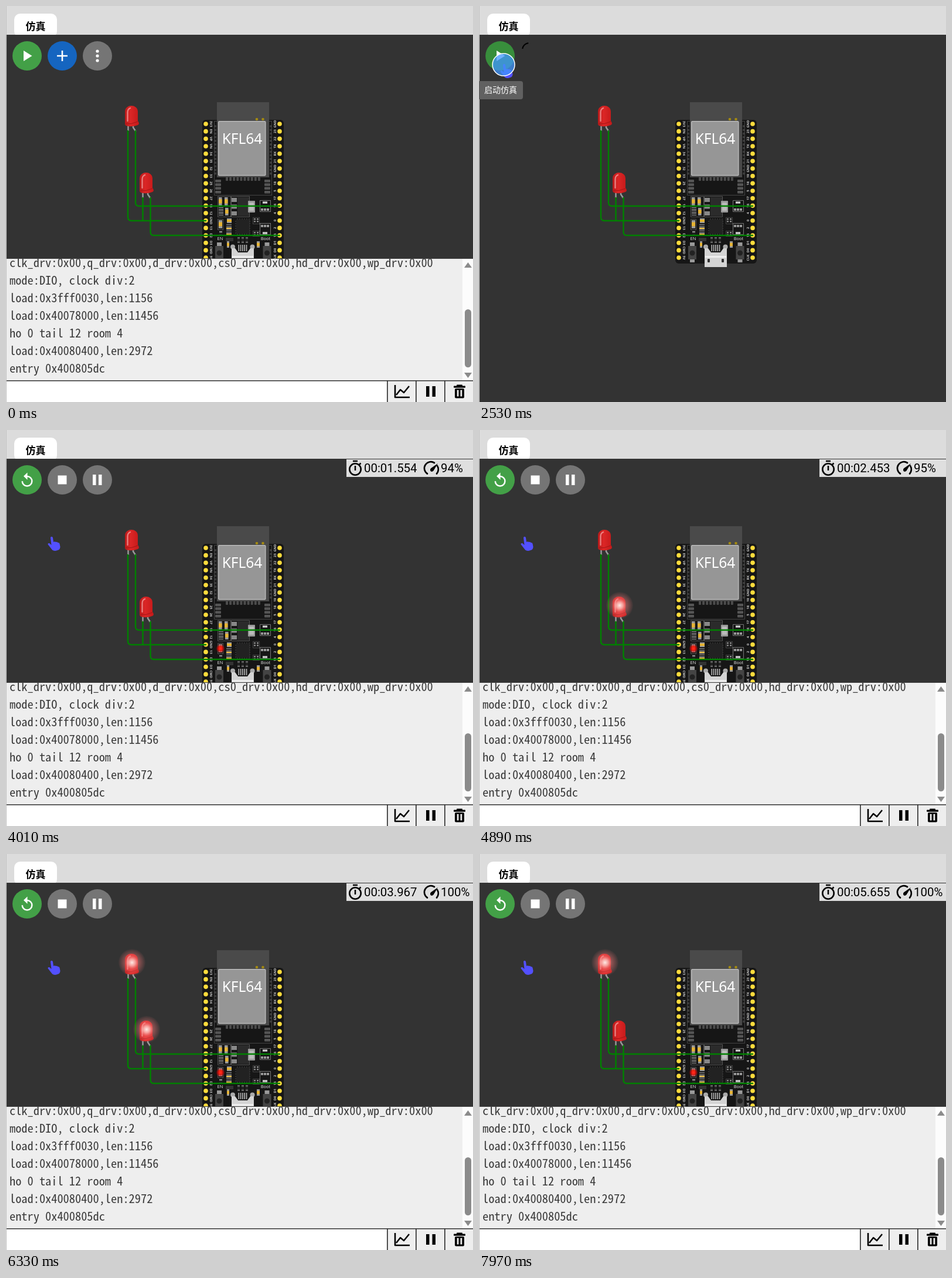
Recreate the animation shown at these times as an HTML page with a canvas. Size 797x675 px, loop 8 s.

```html
<!DOCTYPE html>
<html lang="zh">
<head>
<meta charset="utf-8">
<style>
html, body { margin: 0; width: 100%; height: 100%; overflow: hidden; background: #dcdcdc; }
canvas { display: block; }
</style>
</head>
<body>
<canvas id="stage" width="797" height="675"></canvas>
<script>
const g = document.getElementById('stage').getContext('2d');
const LOOP = 8000, RUN = 2570, CLICK = 2370, TAU = Math.PI * 2;
const SANS = '"Noto Sans", "Open Sans", sans-serif';
const CJK = '"Noto Sans CJK SC", "Noto Sans CJK", sans-serif';
const MONO = '"Noto Sans Mono CJK SC", "Liberation Mono", monospace';

// Choose the console size from the advance of one character.
g.font = '100px ' + MONO;
const monoSize = 1018 / g.measureText('0').width;

const LOG = [
  'clk_drv:0x00,q_drv:0x00,d_drv:0x00,cs0_drv:0x00,hd_drv:0x00,wp_drv:0x00',
  'mode:DIO, clock div:2',
  'load:0x3fff0030,len:1156',
  'load:0x40078000,len:11456',
  'ho 0 tail 12 room 4',
  'load:0x40080400,len:2972',
  'entry 0x400805dc'
];
const LEFT_PINS = '3V3 EN VP VN 34 35 32 33 25 26 27 14 12 GND 13 D2 D3 CMD 5V'.split(' ');
const RIGHT_PINS = 'GND 23 22 TX RX 21 GND 19 18 5 17 16 4 0 2 15 D1 D0 CLK'.split(' ');

// Keyframes: [time, value, ...]
const CURSOR = [[1080, 125, 557], [1400, 48, 192], [1690, 48, 192], [1970, 40, 150],
  [2170, 47, 111], [2570, 47, 111], [2890, 82, 194]];
const CLOCK = [[RUN, .084], [3090, .615], [4890, 2.453], [6330, 3.967], [7970, 5.655]];
const SPEED = [[3090, 93], [4890, 95], [6330, 100]];

function at(keys, t, ease = x => x) {
  if (t <= keys[0][0]) return keys[0].slice(1);
  for (let i = 1; i < keys.length; i++) {
    const [a, b] = [keys[i - 1], keys[i]];
    if (t < b[0]) {
      const k = ease((t - a[0]) / (b[0] - a[0]));
      return a.slice(1).map((v, j) => v + (b[j + 1] - v) * k);
    }
  }
  return keys[keys.length - 1].slice(1);
}

function rect(x, y, w, h, color, r = 0) {
  g.fillStyle = color;
  g.beginPath();
  g.roundRect(x, y, w, h, r);
  g.fill();
}
function frame(x, y, w, h, color = '#777') {
  g.strokeStyle = color;
  g.lineWidth = 1;
  g.strokeRect(x + .5, y + .5, w, h);
}
function disc(x, y, r, color) {
  g.fillStyle = color;
  g.beginPath();
  g.arc(x, y, r, 0, TAU);
  g.fill();
}
function shape(d, color) {
  g.fillStyle = color;
  g.fill(new Path2D(d));
}
function line(d, color, width, cap = 'butt') {
  g.strokeStyle = color;
  g.lineWidth = width;
  g.lineCap = cap;
  g.lineJoin = 'round';
  g.stroke(new Path2D(d));
}
function text(s, x, y, font, color = '#000', align = 'left') {
  g.font = font;
  g.fillStyle = color;
  g.textAlign = align;
  g.fillText(s, x, y);
}
function shifted(x, y, draw, turn = 0) {
  g.save();
  g.translate(x, y);
  g.rotate(turn);
  draw();
  g.restore();
}

function part(x, y, w, h, body, caps = '#999') {
  rect(x, y, w, h, caps);
  rect(x, y + h * .25, w, h * .5, body);
}

function pins() {
  for (const [x, tx, names, turn] of [[341, 349.5, LEFT_PINS, 1], [467, 459, RIGHT_PINS, -1]])
    names.forEach((name, i) => {
      const y = 201 + i * 12.67;
      disc(x, y, 3.8, '#ffdc3c');
      shifted(tx, y, () => text(name, 0, 2, 'bold 5.8px ' + SANS, '#ccc', 'center'), turn * Math.PI / 2);
    });
}

function chipModule() {
  frame(355, 196, 98, 126, '#444');
  rect(360, 164, 89, 128, '#4a4a4a');
  for (let i = 0; i < 14; i++)
    for (const x of [356, 450]) rect(x, 203 + i * 6.2, 3, 4, '#3c3c3c', 1);
  for (let i = 0; i < 10; i++) rect(375 + i * 6.1, 292, 4, 6, '#4c4c4c', 1);
  for (let i = 0; i < 4; i++)
    for (const x of [357, 441]) rect(x, 296 + i * 6.3, 10, 4.5, '#555', 1);
  disc(428, 193, 2.3, '#a38a13');
  disc(438.5, 193, 2.3, '#a38a13');
  rect(362, 196, 81.5, 93.5, '#c4c4c4', 2);
  rect(363.3, 197.2, 79, 91, '#969696');
  text('KFL64', 403, 235, '24.5px ' + SANS, '#fff', 'center');
}

function components() {
  const gold = '#e6b434';
  frame(361, 324, 22, 35, '#555');
  part(363, 326, 5.5, 14, gold);
  part(373, 326, 5.5, 14, gold);
  part(374, 344, 5.5, 13, gold);
  for (let i = 0; i < 3; i++) part(363, 343 + i * 5, 8, 4, '#222');
  frame(384, 324, 31, 35, '#555');
  rect(395, 326, 20, 32, '#2b2b2b');
  for (let i = 0; i < 3; i++) rect(385, 327 + i * 11.5, 9, 7, '#888');
  rect(413, 332, 12, 20, '#999', 1);
  rect(415, 335, 8, 14, '#bbb');
  for (const [y, row] of [[331, 345], [370, 373]]) {
    frame(433, y, 18, 19, '#777');
    for (let i = 0; i < 3; i++) rect(435 + i * 5, row, 4, 4, '#999');
    part(438, y === 331 ? 333 : 385, 8, 4, '#ccc');
  }
  for (const [y, h] of [[360, 11], [383, 9]]) {
    frame(421, y, 11, h, '#444');
    for (let i = 0; i < 4; i++) rect(423 + i % 2 * 5, y + 2 + (i >> 1) * 4, 3, 2.5, '#888');
  }
  for (let i = 0; i < 6; i++) {
    rect(394 + i * 4, 362, 2, 28, '#303030');
    rect(391, 366 + i * 4, 26, 2, '#303030');
  }
  rect(393, 364, 22, 24, '#222');
  frame(361, 363, 9, 18, '#555');
  part(363, 365, 6, 14, gold);
  part(377, 362, 8, 8, gold);
  for (let i = 0; i < 4; i++) part(376, 372 + i * 5, 9, 4, i % 2 ? gold : '#222');
  part(364, 384, 5, 8, '#222');
  for (let i = 0; i < 3; i++) part(395 + i * 7, 394, 4, 10, '#222', '#666');
  rect(375, 395, 13, 6, '#333');
  text('EN', 365.5, 399, '7.5px ' + SANS, '#ddd', 'center');
  text('Boot', 443, 399, '7.5px ' + SANS, '#ddd', 'center');
  part(377, 401, 4, 11, gold);
  part(428, 401, 5, 11, gold);
  for (const x of [364, 445.5]) {
    rect(x - 4, 403, 8, 34, '#999');
    rect(x - 7, 409, 14, 23, '#444');
    disc(x, 421, 4.5, '#222');
  }
  disc(387, 410.5, 4, '#aaa');
  disc(420.5, 410.5, 4, '#aaa');
  for (let i = 0; i < 5; i++) rect(396.5 + i * 3.3, 407, 1.6, 11, '#bbb');
  shape('M385 445V413H391L396 420H412L417 413H423V445Z', '#d4d4d4');
  rect(386, 426, 36, 3, '#eee');
  rect(390, 431, 4, 6, '#333', 1);
  rect(414, 431, 4, 6, '#333', 1);
}

function ledBody() {
  line('M-5.5 33V43M3 33V37L7 43V44', '#999', 2.5);
  const tint = g.createLinearGradient(-11, 0, 13, 0);
  tint.addColorStop(0, '#b81a1a');
  tint.addColorStop(.4, '#dc2626');
  tint.addColorStop(1, '#c41a1a');
  shape('M-11 31V10C-11-3.3 11-3.3 11 10V26Q13 28 13 31L11 33Q0 37-9 34Q-11 33-11 31Z', tint);
  line('M11 27Q0 32-10 31', '#a31515', 1);
  line('M-6.5 26V11Q-6.5 6-2 4', 'rgba(255,190,190,.6)', 2.4, 'round');
}
function ledGlow() {
  const glow = g.createRadialGradient(1, 15, 0, 1, 15, 23);
  glow.addColorStop(0, 'rgba(255,246,240,.95)');
  glow.addColorStop(.25, 'rgba(255,190,185,.8)');
  glow.addColorStop(.5, 'rgba(255,120,120,.45)');
  glow.addColorStop(.8, 'rgba(255,120,120,.2)');
  glow.addColorStop(1, 'rgba(255,120,120,.03)');
  disc(1, 15, 23, glow);
}

function circuit(running, clock) {
  rect(335, 194, 139, 245, '#161616', 6);
  pins();
  chipModule();
  components();
  if (running) {
    const red = g.createRadialGradient(366, 372.5, 1, 366, 372.5, 8);
    red.addColorStop(0, '#ff2a20');
    red.addColorStop(.4, 'rgba(235,0,0,.8)');
    red.addColorStop(1, 'rgba(200,0,0,0)');
    disc(366, 372.5, 8, red);
  }
  shifted(214, 170, ledBody);
  shifted(239, 284, ledBody);
  line('M208 213V360Q208 366 214 366H341M233.5 327V366M221 213V335Q221 341 227 341H467' +
    'M246.5 327V385Q246.5 391 252 391H467', '#008000', 2.5, 'round');
  if (!running) return;
  const u = clock - .635;
  const lit = period => u >= 0 && Math.floor(u / period) % 2 === 0;
  if (lit(.5)) shifted(214, 170, ledGlow);
  if (lit(.7) || clock < .4) shifted(239, 284, ledGlow);
}

function button(x, color) {
  disc(x, 85, 25, color);
}
function idleButtons() {
  button(96, '#1565c0');
  line('M87 85H105M96 76V94', '#fff', 2.6);
  button(156, '#757575');
  for (const y of [77, 85, 93]) disc(156, y, 2.6, '#fff');
}
function runButtons() {
  button(36, '#43a047');
  line('M36 79A8.3 8.3 0 1 1 27.7 87.3', '#fff', 2.5);
  shape('M36.5 72.5V85L30 78.8Z', '#fff');
  button(96, '#757575');
  rect(88.5, 77.5, 15, 15, '#fff');
  button(156, '#757575');
  rect(148, 76, 5.5, 18, '#fff');
  rect(158, 76, 5.5, 18, '#fff');
}

function statusBox(clock, speed) {
  rect(581, 50, 216, 30, '#dfdfdf');
  g.strokeStyle = '#000';
  g.lineWidth = 2.6;
  g.beginPath();
  g.arc(596, 67, 9.7, 0, TAU);
  g.stroke();
  line('M592 53H600M596 61V69M603 59L605.5 56.5', '#000', 2.5);
  const font = '20.4px Roboto, sans-serif';
  const s = clock.toFixed(3).padStart(6, '0');
  text('00:' + s, 611, 72, font);
  line('M719 74.5A11 11 0 0 1 731 56M736 61A11 11 0 0 1 735 74.5', '#000', 2.7, 'round');
  shape('M737 57L729.5 69.5Q727 72 724.5 70Q723 67 725.5 65Z', '#000');
  text(Math.round(speed) + '%', 742, 72, font);
}

function consolePanel() {
  rect(1, 430, 796, 245, '#eee');
  rect(1, 430, 796, 1, '#444');
  g.save();
  g.beginPath();
  g.rect(1, 431, 778, 207);
  g.clip();
  LOG.forEach((s, i) => text(s, 6, 445 + i * 30, monoSize + 'px ' + MONO, '#3a3a3a'));
  g.restore();
  rect(779, 431, 18, 207, '#fcfcfc');
  rect(783, 517, 11, 99, '#8b8b8b', 5.5);
  shape('M782 446L788.5 437L795 446ZM782 625L788.5 634L795 625Z', '#8b8b8b');
  rect(1, 638, 796, 37, '#fff');
  rect(651, 638, 146, 37, '#eee');
  rect(1, 638, 796, 1.5, '#333');
  for (const x of [650, 699, 748]) rect(x, 639, 1.7, 36, '#333');
  line('M664 646V667H689', '#000', 2.6);
  line('M666 663L673 654L679 659L688 648', '#000', 2.5);
  rect(717, 648, 5.5, 18, '#000');
  rect(727.5, 648, 5.5, 18, '#000');
  rect(764, 647.5, 20, 3.2, '#000', 1);
  rect(769, 645.5, 10, 4, '#000', 1);
  rect(766, 652, 16, 16.5, '#000', 2);
  rect(769.7, 654.5, 2.8, 11, '#eee');
  rect(775.5, 654.5, 2.8, 11, '#eee');
}

function hand() {
  shape('M-6-10C-6-13-2.5-13-2-10L-1-3Q1-4.5 3-3Q5-4 6.5-2Q9-2.5 9.5 0L10.5 5Q10.5 10 6 11' +
    'Q0 13-3 10.5L-10.5 1Q-11-1.5-8-1L-4.5 2Z', '#5350ff');
}

function clickRing(t) {
  const grow = Math.min(1, (t - CLICK) / 160);
  g.globalAlpha = Math.min(1, Math.max(0, (2650 - t) / 100));
  disc(42, 100, 8 + 11 * grow, 'rgba(64,150,255,.75)');
  g.strokeStyle = '#fff';
  g.lineWidth = 1.5;
  g.stroke();
  g.globalAlpha = 1;
}

function spinner(t) {
  const turn = (190 + (t - 2530) * .257) * TAU / 360;
  g.strokeStyle = '#000';
  g.lineWidth = 2.2;
  g.lineCap = 'butt';
  g.beginPath();
  g.arc(86, 75, 12, turn, turn + 1.25);
  g.stroke();
}

function draw(t) {
  const running = t >= RUN, loading = t >= 2410 && !running;
  const [clock] = at(CLOCK, t);
  rect(0, 0, 797, 675, '#dcdcdc');
  rect(0, 0, 1, 675, '#c4c4c4');
  rect(14, 13, 73, 40, '#fff', 10);
  text('仿真', 50.5, 41, 'bold 17px ' + CJK, '#000', 'center');
  rect(1, 49, 796, 626, '#333');
  circuit(running, clock);

  if (running) {
    runButtons();
    statusBox(clock, at(SPEED, t)[0]);
  } else {
    button(36, t >= 2090 ? '#388e3c' : '#43a047');
    shape('M30 76V94L44.5 85Z', '#fff');
    if (loading) spinner(t);
    else idleButtons();
  }
  if (!loading && (t < RUN || t >= 2730)) consolePanel();

  if (t >= 2210 && t < 2610) {
    rect(-4, 128, 79, 31, '#616161', 4);
    text('启动仿真', 9, 148, '14px ' + CJK, '#fff');
  }
  if (t >= 1080) {
    const [x, y] = at(CURSOR, t, k => k * (2 - k) * .4 + k * .6);
    shifted(x, y, hand);
  }
  if (t >= CLICK && t < 2650) clickRing(t);
}

function tick(now) {
  const t = now % LOOP;
  draw(t < 1080 ? 0 : t < 1090 ? 1080 : Math.floor((t - 10) / 40) * 40 + 10);
  requestAnimationFrame(tick);
}
requestAnimationFrame(tick);
</script>
</body>
</html>
```
